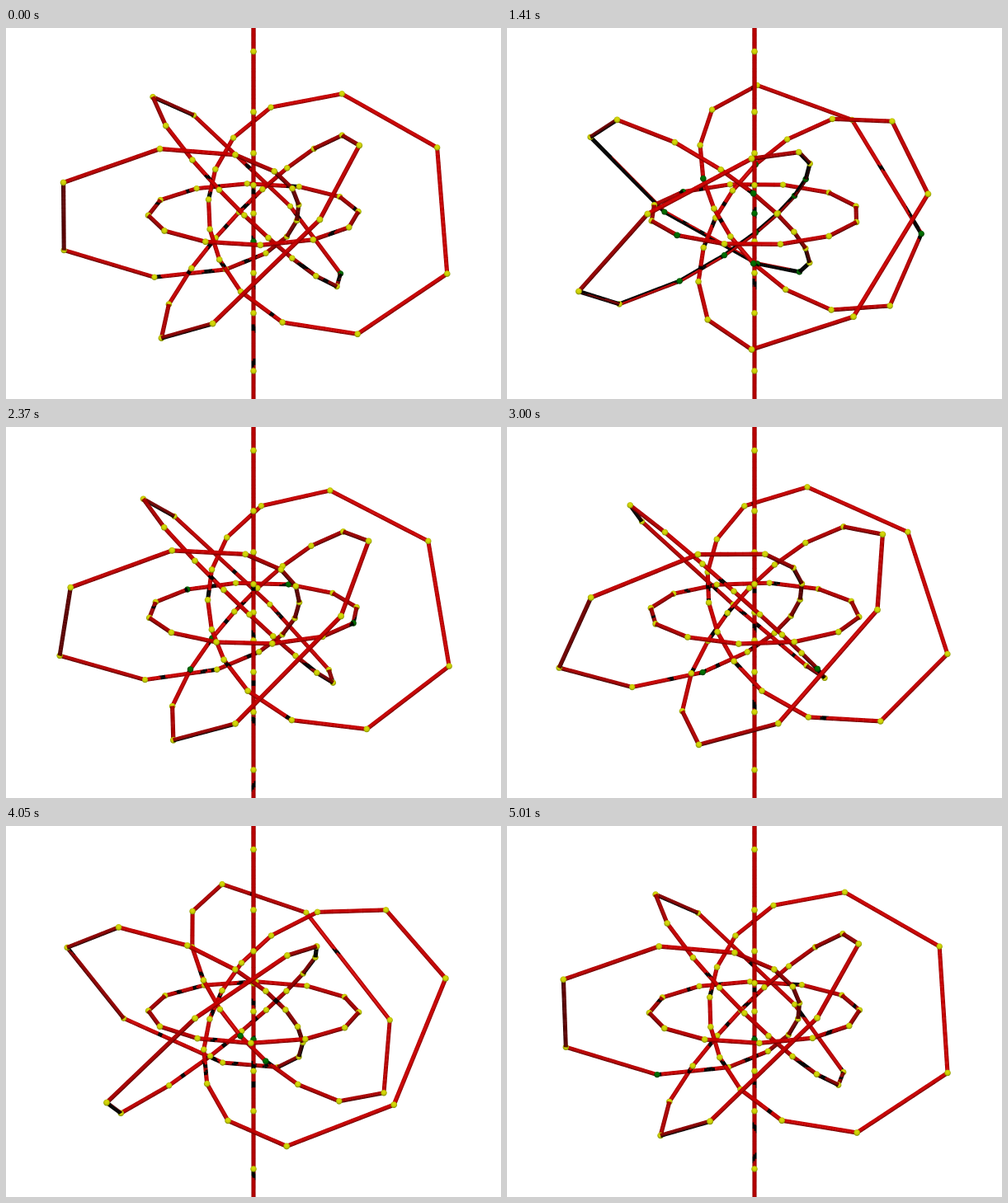
Recreate the animation shown at these times as an HTML page with a canvas. Size 600x450 px, loop 5040 ms.

```html
<!DOCTYPE html>
<html>
<head>
<meta charset="utf-8">
<style>
html, body { margin: 0; height: 100%; overflow: hidden; background: #fff; }
canvas { display: block; width: 600px; height: 450px; }
</style>
</head>
<body>
<canvas id="stage" width="1200" height="900"></canvas>
<script>
const ctx = document.getElementById('stage').getContext('2d');
ctx.scale(2, 2);
const RAD = Math.PI / 180, DIST = 30, ZOOM = 140.3;
const ROD = 0.0178, BALL = 0.027;
const START = 3.6, STEP = 90 / 85;
const TILT = 17 * RAD, C = Math.cos(TILT), S = Math.sin(TILT);
const VIEW = [0, -C, S];
const LIGHT = [0, -Math.sqrt(2 / 3), Math.sqrt(1 / 3)], LAMP_DIST = 24;

const dot = (a, b) => a[0] * b[0] + a[1] * b[1] + a[2] * b[2];
const cross = (a, b) => [
  a[1] * b[2] - a[2] * b[1], a[2] * b[0] - a[0] * b[2], a[0] * b[1] - a[1] * b[0]];
const mad = (a, b, k) => [a[0] + b[0] * k, a[1] + b[1] * k, a[2] + b[2] * k];
const times = (a, k) => [a[0] * k, a[1] * k, a[2] * k];
const unit = a => times(a, 1 / Math.hypot(...a));
const LAMP = times(LIGHT, LAMP_DIST);
const HALF = unit(mad(VIEW, LIGHT, 1));

// x right, y away from the viewer, z up
const depth = p => dot(p, VIEW);
const scaleAt = p => ZOOM * DIST / (DIST - depth(p));
function project(p) {
  const k = scaleAt(p);
  return [300 + p[0] * k, 225 - (p[2] * C + p[1] * S) * k];
}

// Point of the 3-sphere, seen from slightly outside its pole
function spherePoint(a, b, turn, lift) {
  const k = 1 / (1.1 - b * Math.cos(lift * RAD));
  return [a * Math.cos(turn * RAD) * k, a * Math.sin(turn * RAD) * k,
    b * Math.sin(lift * RAD) * k];
}

// Position as seen from the lamp: two coordinates across the beam, one towards it
function toLight(p) {
  const w = dot(p, LIGHT), k = LAMP_DIST / (LAMP_DIST - w);
  return [p[0] * k, (p[1] * LIGHT[2] - p[2] * LIGHT[1]) * k, w];
}

function buildScene(angle) {
  const rods = [], balls = [];
  const chain = (points, closed) => {
    balls.push(...points);
    points.forEach((p, i) => {
      if (i || closed) {
        const a = points[(i || points.length) - 1];
        rods.push({ a, b: p, la: toLight(a), lb: toLight(p) });
      }
    });
  };
  const dozen = [...Array(12).keys()];
  chain(dozen.slice(1).map(i => spherePoint(0, 1, 0, i * 30 - 180)), false);
  chain(dozen.map(i => spherePoint(1, 0, angle + i * 30, 90)), true);
  for (let k = 0; k < 4; k++) {
    chain(dozen.map(i => {
      const lift = 15 + i * 30;
      return spherePoint(Math.SQRT1_2, Math.SQRT1_2, lift + angle + k * 90, lift);
    }), true);
  }
  return { rods, balls };
}

function inShadow(p, rods, self, gap) {
  const [u, v, w] = toLight(p);
  for (const r of rods) {
    if (r === self) continue;
    const a = r.la, b = r.lb;
    const du = b[0] - a[0], dv = b[1] - a[1];
    let t = ((u - a[0]) * du + (v - a[1]) * dv) / (du * du + dv * dv + 1e-9);
    t = Math.max(0, Math.min(1, t));
    const eu = a[0] + du * t - u, ev = a[1] + dv * t - v;
    if (eu * eu + ev * ev < ROD * ROD && a[2] + (b[2] - a[2]) * t > w + gap) return true;
  }
  return false;
}

function strip(from, to, color) {
  ctx.strokeStyle = color;
  ctx.beginPath();
  ctx.moveTo(...project(from));
  ctx.lineTo(...project(to));
  ctx.stroke();
}

// One short length of rod, as strips of different slope, split where shadows begin and end
function drawPiece({ rod, from, to, axis, side, face }, rods) {
  const span = mad(to, from, -1), mid = mad(from, span, 0.5);
  const toLamp = unit(mad(LAMP, mid, -1));
  const count = Math.ceil(Math.hypot(...span) / 0.02);
  ctx.lineWidth = ROD * 0.45 * scaleAt(mid);
  for (const q of [-0.8, 0.8, -0.4, 0.4, 0]) {
    const normal = mad(times(side, q), face, Math.sqrt(1 - q * q));
    const lit = Math.max(0, dot(normal, toLamp));
    const red = 206 * Math.pow(lit, 0.45);
    const shine = 55 * Math.pow(Math.max(0, dot(normal, HALF)), 200);
    const bright = `rgb(${red + shine},${shine},${shine})`;
    const at = i => mad(mad(from, span, i / count), side, q * ROD);
    const dark = i => !lit ||
      inShadow(mad(mad(from, span, (i + 0.5) / count), normal, ROD), rods, rod, 0.05);
    let begin = 0, state = dark(0);
    for (let i = 1; i <= count; i++) {
      const next = i < count && dark(i);
      if (i < count && next === state) continue;
      strip(mad(at(begin), axis, -0.003), mad(at(i), axis, 0.003), state ? '#000' : bright);
      begin = i;
      state = next;
    }
  }
}

function drawBall(p, rods) {
  const [x, y] = project(p), r = BALL * scaleAt(p);
  const dark = inShadow(mad(p, VIEW, BALL), rods, null, 0.06);
  const shade = ctx.createRadialGradient(x, y - r * 0.31, 0, x, y - r * 0.1, r * 1.15);
  const stops = dark ? ['#007800', '#006400', '#003000'] : ['#dcdc10', '#c8cc00', '#6c7c00'];
  stops.forEach((c, i) => shade.addColorStop([0, 0.6, 1][i], c));
  ctx.fillStyle = shade;
  ctx.beginPath();
  ctx.arc(x, y, r, 0, 7);
  ctx.fill();
}

function render(angle) {
  const { rods, balls } = buildScene(angle);
  const items = balls.map(p => ({ z: depth(p) + 0.03, draw: () => drawBall(p, rods) }));
  for (const rod of rods) {
    const span = mad(rod.b, rod.a, -1);
    const axis = unit(span), side = unit(cross(axis, VIEW));
    const face = cross(side, axis);
    const count = Math.ceil(Math.hypot(...span) / 0.08);
    for (let i = 0; i < count; i++) {
      const from = mad(rod.a, span, i / count), to = mad(rod.a, span, (i + 1) / count);
      const piece = { rod, from, to, axis, side, face };
      items.push({ z: (depth(from) + depth(to)) / 2, draw: () => drawPiece(piece, rods) });
    }
  }
  ctx.fillStyle = '#fff';
  ctx.fillRect(0, 0, 600, 450);
  items.sort((a, b) => a.z - b.z).forEach(item => item.draw());
}

// The quarter turn runs forwards, then backwards
let shown = -1;
function tick() {
  const n = Math.floor(performance.now() / 30) % 168;
  const step = Math.min(n, 168 - n);
  if (step !== shown) {
    shown = step;
    render(START - step * STEP);
  }
  requestAnimationFrame(tick);
}
tick();
</script>
</body>
</html>
```
